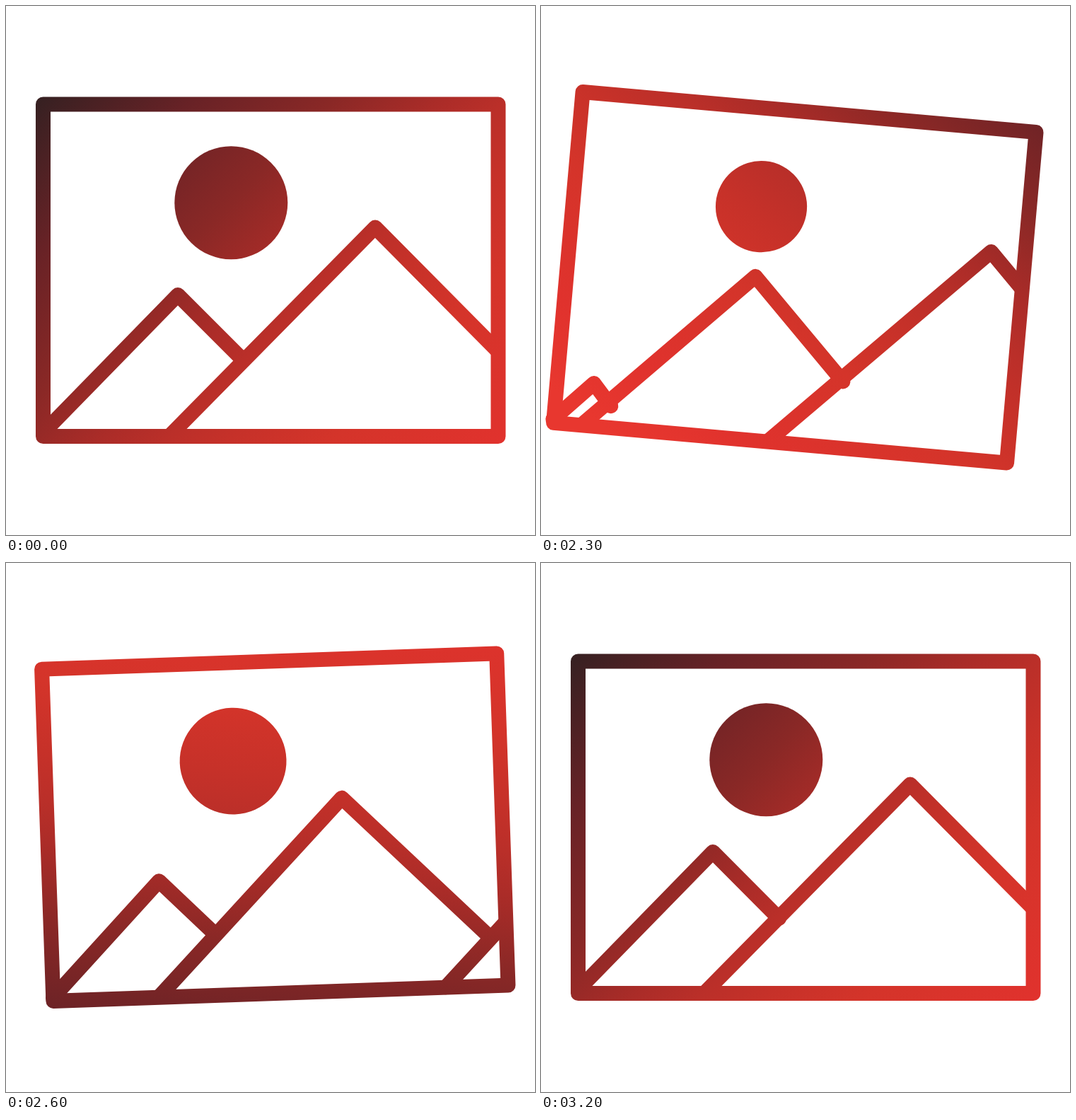
Animation of 748 by 748 pixels, one loop 3.23 s. Source, as an HTML page with a canvas:

```html
<!DOCTYPE html>
<html lang="en">
<head>
<meta charset="utf-8">
<title>Picture icon</title>
<style>
  html, body { margin: 0; width: 100%; height: 100%; overflow: hidden; background: #fff; }
  canvas { display: block; width: 748px; height: 748px; }
</style>
</head>
<body>
<canvas id="stage" width="748" height="748"></canvas>
<script>
const ctx = document.getElementById('stage').getContext('2d');
const LOOP = 3230, START = 2000, END = 3200, STEP = 30;
const LEFT = 52.5, TOP = 139, WIDTH = 643.5, HEIGHT = 469.5;
const PIVOT = { x: 374.25, y: 199 };

const lerp = (a, b, k) => a + (b - a) * k;

function bezier(x1, y1, x2, y2) {
  const at = (a, b, s) => 3 * (1 - s) ** 2 * s * a + 3 * (1 - s) * s * s * b + s ** 3;
  return t => {
    if (t <= 0) return 0;
    if (t >= 1) return 1;
    let lo = 0, hi = 1;
    for (let i = 0; i < 24; i++) {
      const mid = (lo + hi) / 2;
      if (at(x1, x2, mid) < t) lo = mid; else hi = mid;
    }
    return at(y1, y2, lo);
  };
}

const linear = t => t;
const inOut = bezier(.42, 0, .58, 1);
const slide = bezier(.41, 0, .12, 1);
const grow = bezier(.27, 0, .28, 1);
const turn = bezier(.28, 0, .48, 1);

// Each key: time, value, easing towards that value
const TILT = [[2000, 0], [2095, -2, inOut], [2310, 5.1, inOut], [2570, -2.05, inOut],
              [2860, 1, inOut], [3200, 0, linear]];
const DROP = [[2000, 0], [2200, 15, bezier(.3, .2, .6, 1)], [2470, 0, inOut]];
const SUN = [[2000, 80], [2230, 64, inOut], [2940, 80, bezier(.3, 0, .4, 1)]];

function track(keys, t) {
  for (let i = 1; i < keys.length; i++) {
    const [t0, v0] = keys[i - 1], [t1, v1, ease] = keys[i];
    if (t < t1) return lerp(v0, v1, ease(Math.max(0, (t - t0) / (t1 - t0))));
  }
  return keys[keys.length - 1][1];
}

// Foot, peak, foot: each mountain turns into the next one along
const SEED = [[51, 604], [53, 600], [55, 606]];
const SMALL = [[52.5, 603.5], [243, 408.5], [334, 499.5]];
const SMALL_END = [[52.5, 603.5], [243, 408.5], [336.5, 502.5]];
const BIG = [[231, 608], [522, 313], [752, 545]];
const GONE = BIG.map(([x, y]) => [x + 463, y]);

// The peak moves across by `move`; the shape around it grows by `size`
function mountain(from, to, move, size) {
  const x0 = from[1][0], x1 = to[1][0], peak = lerp(x0, x1, move);
  ctx.beginPath();
  from.forEach(([x, y], i) =>
    ctx.lineTo(peak + lerp(x - x0, to[i][0] - x1, size), lerp(y, to[i][1], size)));
  ctx.stroke();
}

const COLORS = [[0, '#2e2021'], [.194, '#682226'], [.347, '#8a2826'], [.462, '#ab2c28'],
                [.529, '#ba2f29'], [.602, '#c63129'], [.71, '#d4342a'], [.886, '#e0322d'],
                [1, '#e8372f']];

function tint(angle) {
  const cx = 488, cy = 368, dx = Math.cos(angle), dy = Math.sin(angle);
  const g = ctx.createLinearGradient(cx - 506 * dx, cy - 506 * dy, cx + 424 * dx, cy + 424 * dy);
  COLORS.forEach(([at, color]) => g.addColorStop(at, color));
  return g;
}

function draw(t) {
  const k = (t - START) / (END - START);
  const p = slide(k), q = grow(k);

  ctx.clearRect(0, 0, 748, 748);
  ctx.save();
  ctx.translate(PIVOT.x, PIVOT.y + track(DROP, t));
  ctx.rotate(track(TILT, t) * Math.PI / 180);
  ctx.translate(-PIVOT.x, -PIVOT.y);
  ctx.lineWidth = 21;
  ctx.lineCap = ctx.lineJoin = 'round';

  ctx.strokeRect(LEFT, TOP, WIDTH, HEIGHT);
  ctx.beginPath();
  ctx.arc(318.3, 278.2, track(SUN, t), 0, 2 * Math.PI);
  ctx.fill();

  ctx.beginPath();
  ctx.rect(0, 0, LEFT + WIDTH, 748);
  ctx.clip();
  if (k > 0) mountain(SEED, SMALL_END, p, p);
  mountain(SMALL, BIG, p, q);
  mountain(BIG, GONE, p, q);
  ctx.restore();

  // Colour the whole silhouette with the turning gradient
  ctx.save();
  ctx.globalCompositeOperation = 'source-in';
  ctx.fillStyle = tint((45 + 360 * turn(k)) * Math.PI / 180);
  ctx.fillRect(0, 0, 748, 748);
  ctx.restore();
}

const origin = performance.now();
function tick() {
  const t = (performance.now() - origin) % LOOP;
  const held = START + Math.floor((t - START) / STEP) * STEP;
  draw(Math.max(START, Math.min(END, held)));
  requestAnimationFrame(tick);
}
tick();
</script>
</body>
</html>
```
